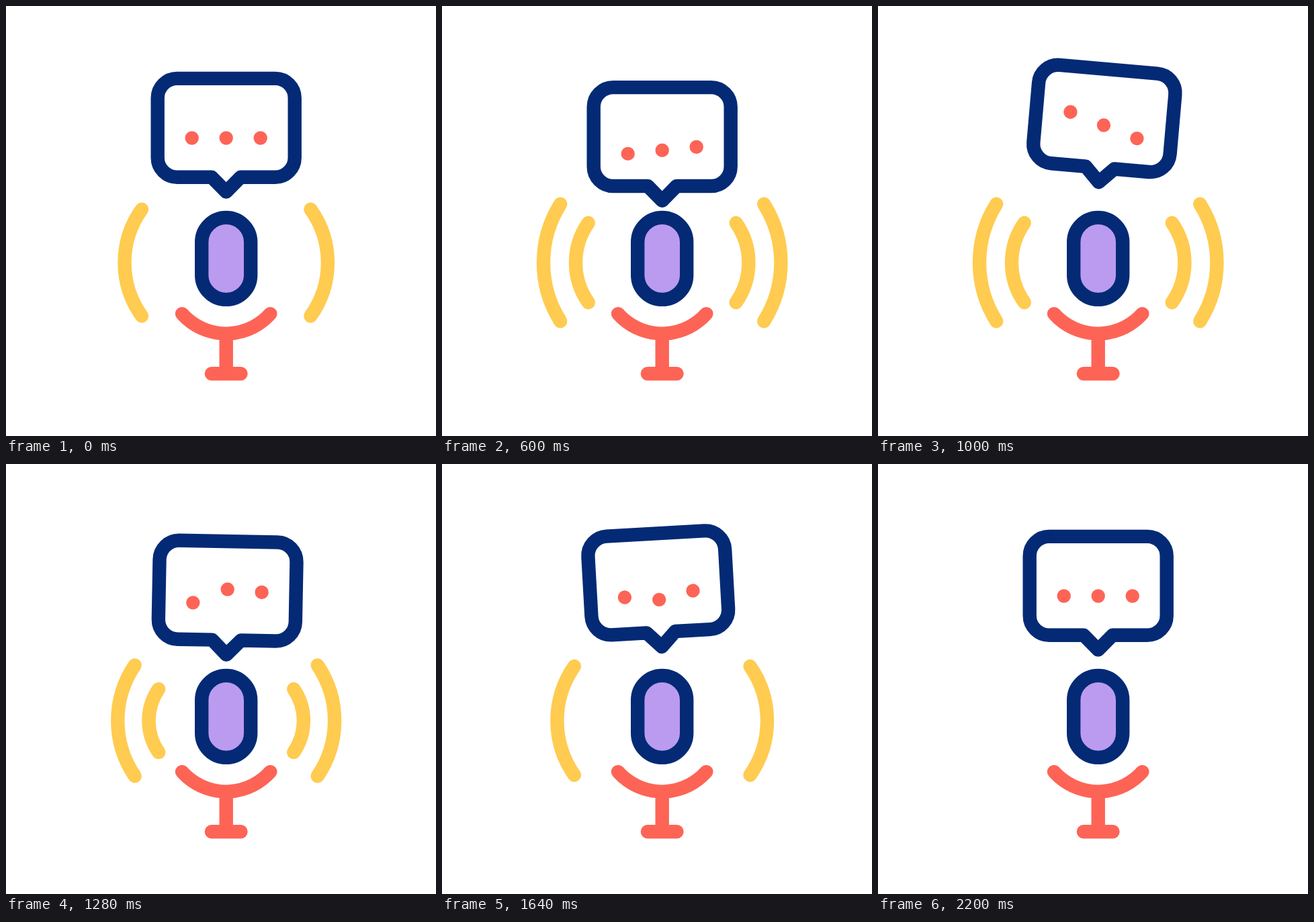
An HTML page with a canvas for the animation above (2400 ms loop, 640 px wide and 640 px high).

```html
<!DOCTYPE html>
<html lang="en">
<head>
<meta charset="utf-8">
<title>Voice message</title>
<style>
  html, body { margin: 0; width: 100%; height: 100%; overflow: hidden; background: #fff; }
  canvas { display: block; width: 640px; height: 640px; }
</style>
</head>
<body>
<canvas id="stage" width="640" height="640"></canvas>
<script>
const ctx = document.getElementById('stage').getContext('2d');
const LOOP = 2400, STEP = 20, BEAT = 400, LEAD = 200;
const CX = 327.7, LINE = 20.4, PIVOT = 286;
const NAVY = '#042a75', CORAL = '#fd6456', YELLOW = '#ffcb50', LILAC = '#ba9bf0';

const ramp = (t, from, span) => Math.min(1, Math.max(0, (t - from) / span));
const smooth = p => p * p * (3 - 2 * p);

// Eases from one pose to the next, one beat each.
function swing(t, ...poses) {
  return poses.reduce((now, pose, i) =>
    now + (pose - now) * smooth(ramp(t, LEAD + (i - 1) * BEAT, BEAT)));
}

function stroke(color, build) {
  ctx.beginPath();
  build();
  ctx.strokeStyle = color;
  ctx.stroke();
}

// A wave is born at the mic, spreads to the middle pose at u = 0, then leaves and fades.
function wave(u) {
  const birth = ramp(u, -600, 200);
  const spread = ramp(u, -BEAT, BEAT);
  const leave = ramp(u, 0, BEAT);
  const alpha = birth - ramp(u, 200, 200);
  if (alpha <= 0) return;
  const x = 50.7 + 55.5 * birth + 45 * spread + 51 * leave;
  const half = 3 + 36 * birth + 40.4 * spread + 15.6 * leave;
  const sag = 2 + 10 * birth + 13.5 * spread - 0.5 * leave;
  const r = (half * half + sag * sag) / (2 * sag);
  const angle = Math.atan2(half, r - sag);
  ctx.globalAlpha = alpha;
  stroke(YELLOW, () => ctx.arc(CX + x - r, 382, r, -angle, angle));
  stroke(YELLOW, () => ctx.arc(CX - x + r, 382, r, Math.PI - angle, Math.PI + angle));
  ctx.globalAlpha = 1;
}

function mic() {
  ctx.fillStyle = LILAC;
  stroke(NAVY, () => {
    ctx.arc(CX, 351.4, 36.5, Math.PI, 0);
    ctx.arc(CX, 400.4, 36.5, 0, Math.PI);
    ctx.closePath();
    ctx.fill();
  });
  const r = 87.9, angle = Math.asin(65.7 / r), cup = 487.6, foot = 547.2;
  stroke(CORAL, () => {
    ctx.arc(CX, cup - r, r, Math.PI / 2 - angle, Math.PI / 2 + angle);
    ctx.moveTo(CX, cup);
    ctx.lineTo(CX, foot);
    ctx.moveTo(CX - 21.8, foot);
    ctx.lineTo(CX + 21.8, foot);
  });
}

function bubble(t) {
  const left = CX - 102, right = CX + 102, top = 107.9, bottom = 254.8, r = 29;
  const low = 13.2, high = -14.3, tilt = Math.PI / 36;
  ctx.save();
  ctx.translate(CX, PIVOT + swing(t, 0, low, high, low, high, 0));
  ctx.rotate(swing(t, 0, 0, tilt, 0, -tilt, 0));
  ctx.translate(-CX, -PIVOT);
  stroke(NAVY, () => {
    ctx.moveTo(CX, 276.6);
    ctx.lineTo(CX - 21.4, bottom);
    ctx.arcTo(left, bottom, left, top, r);
    ctx.arcTo(left, top, right, top, r);
    ctx.arcTo(right, top, right, bottom, r);
    ctx.arcTo(right, bottom, left, bottom, r);
    ctx.lineTo(CX + 21.4, bottom);
    ctx.closePath();
  });
  ctx.fillStyle = CORAL;
  for (let i = 0; i < 3; i++) {
    const hop = swing(t - i * BEAT / 2, 0, 10.2, -20.4, 10.2, 0);
    ctx.beginPath();
    ctx.arc(CX + (i - 1) * 51, 196.5 + hop, 10.2, 0, Math.PI * 2);
    ctx.fill();
  }
  ctx.restore();
}

function draw(t) {
  ctx.fillStyle = '#fff';
  ctx.fillRect(0, 0, 640, 640);
  ctx.lineWidth = LINE;
  ctx.lineCap = ctx.lineJoin = 'round';
  wave(Math.max(0, t - BEAT)); // the first wave waits in the middle pose
  for (let i = 2; i <= 4; i++) wave(t - i * BEAT);
  mic();
  bubble(t);
}

const start = performance.now();
function tick() {
  const t = (performance.now() - start) % LOOP;
  draw(Math.floor(t / STEP) * STEP);
  requestAnimationFrame(tick);
}
tick();
</script>
</body>
</html>
```
